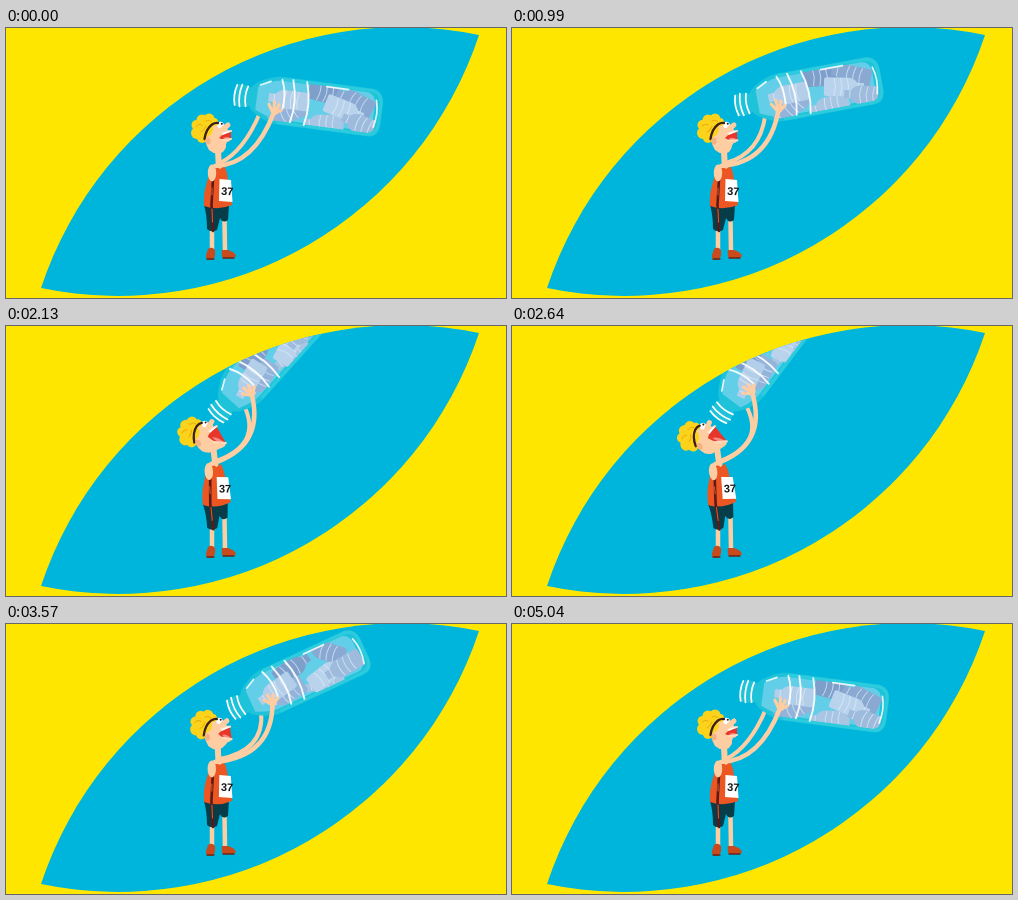
An HTML page that plays this animation: 500 by 270 pixels, repeating every 5070 ms.

```html
<!DOCTYPE html>
<html lang="en">
<head>
<meta charset="utf-8">
<title>Thirsty runner</title>
<style>
html, body { margin: 0; width: 100%; height: 100%; overflow: hidden; background: #ffe600; }
svg { display: block; width: 500px; height: 270px; }
.line { fill: none; stroke-linecap: round; stroke-linejoin: round; }
.skin { stroke: #ffcda2; }
.white { stroke: #fff; }
text { font: bold 11px "Liberation Sans", Arial, sans-serif; text-anchor: middle; fill: #161616; }
</style>
</head>
<body>
<svg viewBox="0 0 500 270">
  <defs>
    <path id="leafShape" d="M35 260A380 380 0 0 1 473 7A380 380 0 0 1 35 260Z"/>
    <clipPath id="leaf"><use href="#leafShape"/></clipPath>
    <path id="shell" d="M2-11H14L17-9Q20-14 28-18Q38-24 48-24H139Q150-22 150-9V10Q150 24 138 24H48Q38 24 28 18Q20 14 17 9L14 11H2Q-1 0 2-11Z"/>
    <clipPath id="inside"><path d="M20-10Q38-21 48-21H136Q145-20 145-9V10Q145 21 136 21H48Q38 21 20 10Z"/></clipPath>
    <g id="mini">
      <path d="M-19-8Q-19-10-16-10H8Q14-9 17-4.500H24V4.500H17Q14 9 8 10H-16Q-19 10-19 8Z"/>
      <path class="line" stroke="#dcecf7" stroke-opacity=".75" d="M-8-9Q-5 0-8 9M-1-9Q2 0-1 9M6-9Q9 0 6 9M18-4V4"/>
    </g>
  </defs>
  <use href="#leafShape" fill="#00b5db"/>
  <g clip-path="url(#leaf)">
    <!-- legs and shoes -->
    <path class="line skin" stroke-width="4.500" d="M206 198V223M218.500 192L219 224"/>
    <path fill="#c94a1c" d="M202 221Q206 218 209 222Q210 231 205 232Q199 232 200 227ZM216 222H222Q229 224 230 228Q229 230 226 230H217Q215 227 216 222Z"/>
    <path class="line" stroke="#6b2413" stroke-width="1.300" d="M201 231H208M217 230H228"/>

    <path id="backArm" class="line skin" stroke-width="4"/>

    <g id="torso">
      <path fill="#073d49" d="M198 177H223L222 192Q217 196 214 190L211 202Q205 205 201 201Q201 187 198 177Z"/>
      <path class="line skin" stroke-width="6" d="M212 122L213 143"/>
      <path fill="#ec5622" d="M204 142Q206 138 210 138L214 141L218 138Q221 142 222 152Q226 165 226 177Q212 183 198 178Q197 166 201 154Z"/>
      <path fill="#fff" d="M213.500 151L225 152L226.500 174L213 173Z"/>
      <text transform="translate(221 167) rotate(3)">37</text>
      <path class="line" stroke="#5a1a18" stroke-width="2.600" d="M207 151L205.500 177L207 203"/>
      <path class="line" stroke="#d9602f" stroke-width="1" d="M206 160V167M206 181L206.500 194"/>
      <ellipse cx="206" cy="145" rx="4.200" ry="8.500" fill="#ffcda2"/>
    </g>

    <g id="bottle">
      <use href="#shell" fill="#1ec3d9"/>
      <path fill="#62cee8" d="M24-11Q38-20 48-20H134Q142-18 142-8V9Q142 19 134 19H48Q38 19 24 12Z"/>
      <g id="minis" clip-path="url(#inside)"></g>
      <path class="line" stroke="#2ccbdd" stroke-width="3" d="M48-22H138Q148-20 148-9V10Q148 22 137 22H48"/>
      <path class="line white" stroke-width="1.700" d="M3-10Q0 0 3 10M8-11Q5 0 8 11M14-10Q11 0 14 10"/>
      <path class="line white" stroke-width="1.900" stroke-opacity=".9" d="M47-21Q53-8 51 8M58-22Q65 0 60 20M72-22Q79 0 74 21"/>
      <path class="line white" stroke-width="1.700" stroke-opacity=".85" d="M143-13Q147 0 143 14M92-20H114M26-13L36-18"/>
    </g>

    <g id="head">
      <path fill="#ffcda2" d="M200 100Q206 92 214 94Q220 97 222 102L219 112Q222 119 217 124Q210 128 203 122Q197 113 200 100Z"/>
      <path id="jaw" fill="#ffcda2"/>
      <path id="mouth" fill="#e8362b"/>
      <path id="tongue" fill="#f58a80"/>
      <path id="lip" class="line" stroke="#ffd9ba" stroke-width="2.200"/>
      <path class="line white" stroke-width="1.700" d="M217 106L223 103.500"/>
      <circle cx="214.500" cy="97" r="3.200" fill="#fff"/>
      <circle cx="215.800" cy="95.800" r="1" fill="#222"/>
      <path class="line skin" stroke-width="5" d="M217 101L222 97"/>
      <g fill="#fcd31b">
        <circle cx="191" cy="105" r="6"/><circle cx="190.500" cy="97" r="5"/>
        <circle cx="196" cy="92" r="5.500"/><circle cx="203" cy="91" r="5.500"/>
        <circle cx="208" cy="94" r="4"/><circle cx="199" cy="101" r="8"/>
        <circle cx="196" cy="110" r="5"/>
      </g>
      <path class="line" stroke="#e9ad12" d="M190 98Q193 95 196 97M195 104Q199 102 200 98M200 93Q204 91 206 94"/>
      <path class="line" stroke="#3a2018" stroke-width="2.300" d="M198.500 111Q200 101 206 96.500Q209 94.500 212 95"/>
      <ellipse cx="202" cy="113" rx="2.600" ry="3.600" fill="#f6b183"/>
    </g>

    <path id="frontArm" class="line skin" stroke-width="4.500"/>
    <path id="hand" class="line skin" stroke-width="3.200" d="M42 13L37 5M43 12L42 2M44 12L47 4M44 13L50 9M42 14L45 13"/>
  </g>
</svg>
<script>
const LOOP = 5070, STEP = 30, REST = 7.5;

// time, bottle angle
const tilt = [[0, 7.5], [150, 7.5], [420, -10.5], [700, 4], [990, -10.5], [1230, -29],
  [1440, -40], [1770, -44], [2130, -48], [2700, -53], [3180, -51], [3360, -46],
  [3600, -22], [3900, 2.5], [3960, 4.5], [4440, 7.2], [4650, 7.5], [LOOP, 7.5]];
// bottle angle, position of its opening
const openingX = [[-53, 204.5], [-51, 206], [-48, 208], [-40, 223], [-10.5, 222], [4.5, 225], [7.5, 227]];
const openingY = [[-53, 93.5], [-51, 93], [-48, 92], [-40, 92], [-10.5, 78], [4.5, 67], [7.5, 66.5]];

// x, y, turn, colour, then the shift in x, y and turn when raised
const minis = [
  [92, -13, 8, "#7f9fcb", -20, 2, -20],
  [124, -8, 200, "#8aa9d2", -10, -4, 25],
  [96, 17, 174, "#a9c5e4", 6, -2, 14],
  [57, 11, 150, "#94b3da", 6, -3, 24],
  [58, -2, 180, "#b3cee9", -4, 3, -12],
  [110, 0, 14, "#b9d3ed", -8, 9, -30],
  [133, 14, 195, "#9ebbdd", -8, -7, -22]
];

const $ = id => document.getElementById(id);
const put = (id, name, value) => $(id).setAttribute(name, value);

// Monotone cubic through [x, y] pairs
function along(keys, x) {
  const slope = i => keys[i + 1] && keys[i] ? (keys[i + 1][1] - keys[i][1]) / (keys[i + 1][0] - keys[i][0]) : 0;
  const tangent = i => {
    const a = slope(i - 1), b = slope(i);
    return a * b > 0 ? 2 * a * b / (a + b) : 0;
  };
  let i = 0;
  while (i < keys.length - 2 && x > keys[i + 1][0]) i++;
  const [x0, y0] = keys[i], [x1, y1] = keys[i + 1], w = x1 - x0;
  const s = Math.min(1, Math.max(0, (x - x0) / w)), r = 1 - s;
  return y0 * r * r * (1 + 2 * s) + y1 * s * s * (3 - 2 * s)
    + w * s * r * (tangent(i) * r - tangent(i + 1) * s);
}

const lift = angle => (REST - angle) / 58.5;

$("minis").innerHTML = minis.map(m => `<use href="#mini" fill="${m[3]}"/>`).join("");
const miniNodes = [...$("minis").children];

function draw(t) {
  const angle = along(tilt, t), up = lift(angle);
  const slide = lift(along(tilt, Math.max(0, t - 210)));
  const x = along(openingX, angle), y = along(openingY, angle);
  const rad = angle * Math.PI / 180, cos = Math.cos(rad), sin = Math.sin(rad);
  const place = (u, v) => [x + u * cos - v * sin, y + u * sin + v * cos];

  const pose = `translate(${x} ${y}) rotate(${angle})`;
  put("bottle", "transform", pose);
  put("hand", "transform", pose);
  minis.forEach(([mx, my, turn, , dx, dy, dturn], i) =>
    miniNodes[i].setAttribute("transform",
      `translate(${mx + dx * slide} ${my + dy * slide}) rotate(${turn + dturn * slide}) scale(.93)`));

  const bend = up ** 5, lean = `rotate(${-4.5 * bend} 212 198)`;
  put("torso", "transform", lean);
  put("head", "transform", `${lean} rotate(${-20.5 * bend} 211 132)`);

  const shift = 5 * bend, reach = (REST - angle) * .6;
  const arm = (id, sx, sy, [hx, hy], cx, cy) =>
    put(id, "d", `M${sx - shift} ${sy}Q${hx + cx} ${hy + cy} ${hx} ${hy}`);
  arm("frontArm", 209, 138, place(43, 12), reach - 20, 53);
  arm("backArm", 214, 135, place(29, 15), reach - 16, 38);

  const gape = Math.min(1, up * up * 1.3), lx = 225 + 3 * gape, ly = 110 + 11 * gape;
  put("jaw", "d", `M206 112L${lx - 3} ${ly - 1}Q${lx + 2} ${ly + 3} ${lx - 4} ${ly + 4}Q217 126 208 125Z`);
  put("mouth", "d", `M213 110Q217 105 225 104L${lx} ${ly}Q${lx - 6} ${ly + 3} 213 110Z`);
  put("tongue", "d", `M217 ${110 + 2 * gape}Q222 ${108 + 5 * gape} ${lx - 1} ${ly}Q${lx - 6} ${ly + 2} 217 ${110 + 2 * gape}Z`);
  put("lip", "d", `M216 104.500L225 103M217 ${112 + 5 * gape}L${lx} ${ly + 1}`);
}

const start = performance.now();
function frame() {
  const t = (performance.now() - start) % LOOP;
  draw(Math.floor(t / STEP) * STEP);
  requestAnimationFrame(frame);
}
frame();
</script>
</body>
</html>
```
